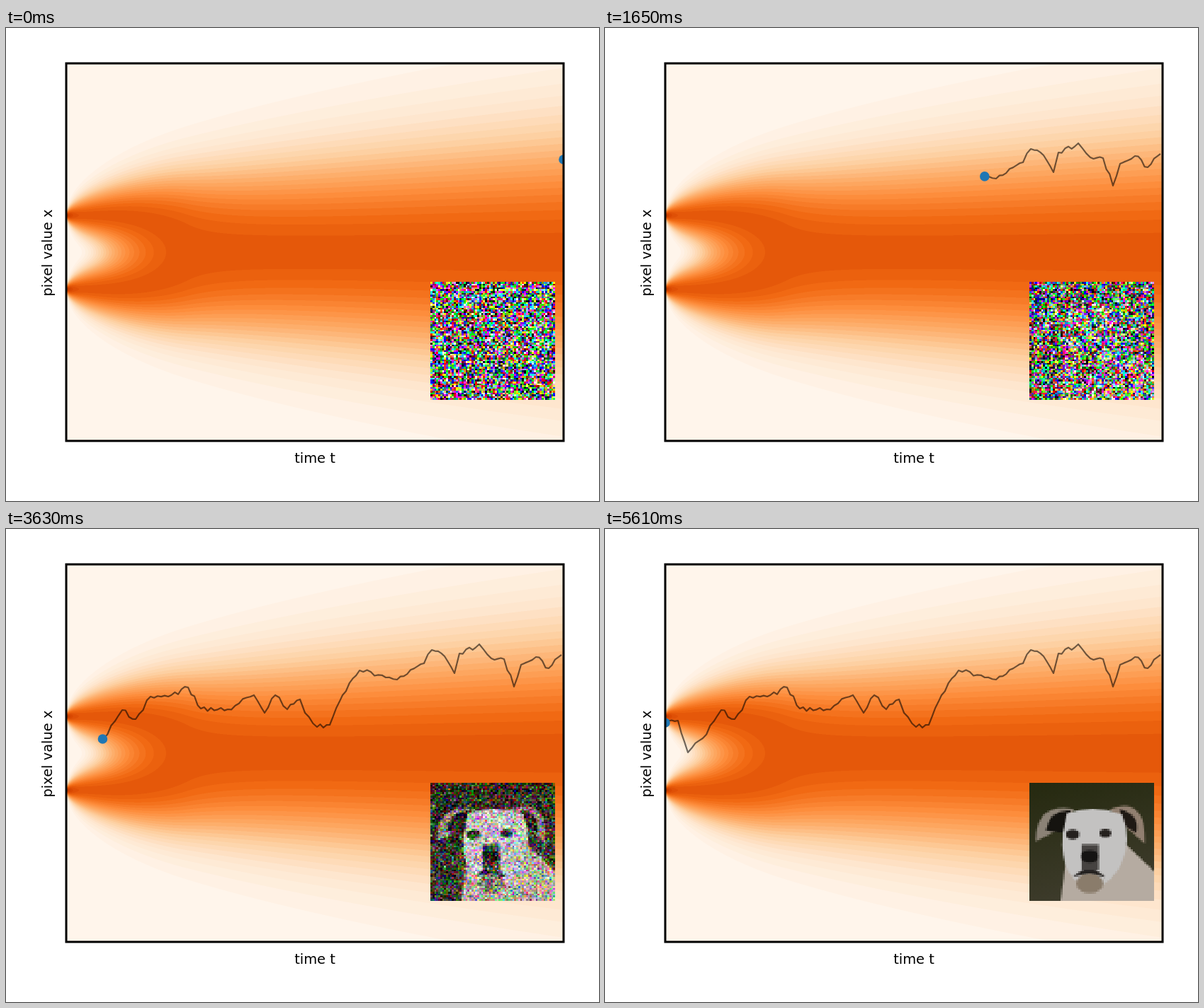
Write an HTML page with a canvas that moves like this. It is 837x669 px and loops after 5940 ms.

```html
<!DOCTYPE html>
<html lang="en">
<head>
<meta charset="utf-8">
<title>Reverse diffusion</title>
<style>
  html, body { margin: 0; width: 100%; height: 100%; overflow: hidden; background: #fff; }
  canvas, svg { position: absolute; left: 0; top: 0; width: 837px; height: 669px; display: block; }
  text { font: 19.44px "DejaVu Sans", sans-serif; text-anchor: middle; fill: #000; }
</style>
</head>
<body>
<canvas id="stage" width="837" height="669"></canvas>
<svg viewBox="0 0 837 669">
  <text x="436" y="615">time t</text>
  <text transform="translate(65 318) rotate(-90)">pixel value x</text>
</svg>
<script>
const STEP = 330, STEPS = 18, GRID = 64, LEVELS = 33;
const box = { x: 85, y: 50, w: 702, h: 534 };
const inset = { x: 599, y: 359, w: 176, h: 167 };
const ctx = document.getElementById('stage').getContext('2d');

function makeContext(w, h) {
  const c = document.createElement('canvas');
  c.width = w;
  c.height = h;
  return c.getContext('2d', { willReadFrequently: true });
}

function randomFrom(seed) {
  return () => {
    seed = (seed + 0x6D2B79F5) | 0;
    let r = Math.imul(seed ^ (seed >>> 15), 1 | seed);
    r = (r + Math.imul(r ^ (r >>> 7), 61 | r)) ^ r;
    return ((r ^ (r >>> 14)) >>> 0) / 4294967296;
  };
}

function gaussian(rnd) {
  return Math.sqrt(-2 * Math.log(1 - rnd())) * Math.cos(2 * Math.PI * rnd());
}

// Evenly spaced band colours from pale to dark orange
function makeBands() {
  const stops = ['fff5eb', 'fee6ce', 'fdd0a2', 'fdae6b', 'fd8d3c', 'f16913', 'd94801', 'a63603', '7f2704']
    .map(hex => [0, 2, 4].map(i => parseInt(hex.slice(i, i + 2), 16)));
  return Array.from({ length: LEVELS }, (_, i) => {
    const p = i / (LEVELS - 1) * 8, k = Math.min(7, Math.floor(p));
    return stops[k].map((v, c) => v + (stops[k + 1][c] - v) * (p - k));
  });
}

// Density of two spreading Gaussians, scaled to its peak in each column
function makeField() {
  const { w, h } = box, sub = 2, mid = 317.2 - box.y, gap = 52.2;
  const bands = makeBands();
  const g = makeContext(w, h), img = g.createImageData(w, h);
  const sum = new Float32Array(w * h * 3);
  const col = new Float32Array(h * sub);
  for (let i = 0; i < w * sub; i++) {
    const x = (i + 0.5) / sub;
    const s2 = 2 * (106 * 106 * x / w + 1);
    let peak = 0;
    for (let j = 0; j < col.length; j++) {
      const d = (j + 0.5) / sub - mid;
      col[j] = Math.exp(-((d - gap) ** 2) / s2) + Math.exp(-((d + gap) ** 2) / s2);
      peak = Math.max(peak, col[j]);
    }
    const gain = (1 + 0.25 * Math.exp(-x / 7)) / peak;
    for (let j = 0; j < col.length; j++) {
      const rgb = bands[Math.min(LEVELS - 1, Math.floor(col[j] * gain / 0.0443))];
      const o = ((j >> 1) * w + (i >> 1)) * 3;
      for (let k = 0; k < 3; k++) sum[o + k] += rgb[k] / (sub * sub);
    }
  }
  for (let p = 0; p < w * h; p++) {
    for (let k = 0; k < 3; k++) img.data[p * 4 + k] = sum[p * 3 + k];
    img.data[p * 4 + 3] = 255;
  }
  g.putImageData(img, 0, 0);
  return g.canvas;
}

// Small flat picture of a pale dog
function makeDog() {
  const g = makeContext(GRID, GRID);
  g.scale(GRID / inset.w, GRID / inset.h);
  g.translate(-inset.x, -inset.y);
  const shape = (fill, d) => { g.fillStyle = fill; g.fill(new Path2D(d)); };
  const blob = (fill, x, y, rx, ry) => {
    g.fillStyle = fill;
    g.beginPath();
    g.ellipse(x, y, rx, ry, 0, 0, 7);
    g.fill();
  };
  const bg = g.createLinearGradient(599, 359, 640, 526);
  bg.addColorStop(0, '#25290f');
  bg.addColorStop(1, '#3d3b2b');
  g.fillStyle = bg;
  g.fillRect(inset.x, inset.y, inset.w, inset.h);
  shape('#b5aba1', 'M643 526L650 470L735 446L775 484V526Z');
  shape('#8b8276', 'M662 396Q608 386 608 442L650 420Z');
  shape('#15130f', 'M657 398Q628 396 622 426L646 430Z');
  shape('#917f70', 'M712 396Q764 376 762 445L738 424Z');
  shape('#1f1914', 'M726 396Q756 404 750 430L734 420Z');
  shape('#c3c2c1', 'M652 402Q690 388 730 404Q744 440 728 475Q714 502 690 508Q640 500 646 430Z');
  blob('#25211e', 660, 432, 9, 7);
  blob('#25211e', 706, 430, 8, 6);
  blob('#8a7c6b', 684, 501, 19, 14);
  shape('#24211f', 'M661 492Q684 468 706 493L684 487Z');
  shape('#464341', 'M673 446H697V482H673Z');
  blob('#151413', 684, 463, 12, 9);
  return g.getImageData(0, 0, GRID, GRID).data;
}

// Random walk: a few key points, right to left, with small jitter between them
function makeWalk() {
  const keys = `784 178,766 197,748 181,727 192,717 223,703 184,685 183,668 163,640 176,633 204,
    619 180,601 171,590 190,552 213,536 210,499 200,475 235,457 277,439 280,422 260,415 241,
    397 255,380 235,365 260,350 235,313 255,275 254,257 224,229 237,204 237,183 269,164 256,
    138 296,117 316,103 271,85 274`.split(',').map(p => p.trim().split(' ').map(Number));
  const rnd = randomFrom(12), points = [keys[0]];
  for (let i = 1; i < keys.length; i++) {
    const [x0, y0] = keys[i - 1], [x1, y1] = keys[i];
    const n = Math.max(1, Math.round((x0 - x1) / 5));
    for (let j = 1; j <= n; j++) {
      const jitter = j < n ? (rnd() - 0.5) * 7 : 0;
      points.push([x0 + (x1 - x0) * j / n, y0 + (y1 - y0) * j / n + jitter]);
    }
  }
  return points;
}

const field = makeField(), dog = makeDog(), walk = makeWalk();
const tile = makeContext(GRID, GRID);
const tileImg = tile.createImageData(GRID, GRID);

function walkY(x) {
  const i = walk.findIndex(p => p[0] <= x);
  if (i <= 0) return 186;
  const [x0, y0] = walk[i - 1], [x1, y1] = walk[i];
  return y0 + (y1 - y0) * (x - x0) / (x1 - x0);
}

function drawTile(step, t) {
  const rnd = randomFrom(step * 977 + 31);
  const px = tileImg.data, sigma = Math.sqrt(t) * 195;
  for (let i = 0; i < px.length; i++) {
    px[i] = i % 4 === 3 ? 255 : 115 + (1 - t) * (dog[i] - 115) + sigma * gaussian(rnd);
  }
  tile.putImageData(tileImg, 0, 0);
  ctx.imageSmoothingEnabled = false;
  ctx.drawImage(tile.canvas, inset.x, inset.y, inset.w, inset.h);
}

function draw(step) {
  const t = (1 - (step / (STEPS - 0.5)) ** 2) ** 5.2;
  const x = box.x + box.w * t, y = walkY(x);
  ctx.fillStyle = '#fff';
  ctx.fillRect(0, 0, 837, 669);
  ctx.drawImage(field, box.x, box.y);
  drawTile(step, t);

  ctx.save();
  ctx.beginPath();
  ctx.rect(box.x, box.y, box.w, box.h);
  ctx.clip();
  if (step > 0) {
    ctx.beginPath();
    for (const p of walk) if (p[0] > x) ctx.lineTo(...p);
    ctx.lineTo(x, y);
    ctx.strokeStyle = 'rgba(0,0,0,.56)';
    ctx.lineWidth = 2.2;
    ctx.lineJoin = 'round';
    ctx.stroke();
  }
  ctx.beginPath();
  ctx.arc(x, y, 6.8, 0, 2 * Math.PI);
  ctx.fillStyle = '#1f77b4';
  ctx.fill();
  ctx.restore();

  ctx.strokeStyle = '#000';
  ctx.lineWidth = 3;
  ctx.strokeRect(box.x, box.y, box.w, box.h);
}

const start = performance.now();
let shown = -1;
function tick() {
  const step = Math.floor((performance.now() - start) / STEP) % STEPS;
  if (step !== shown) draw(shown = step);
  requestAnimationFrame(tick);
}
tick();
</script>
</body>
</html>
```
